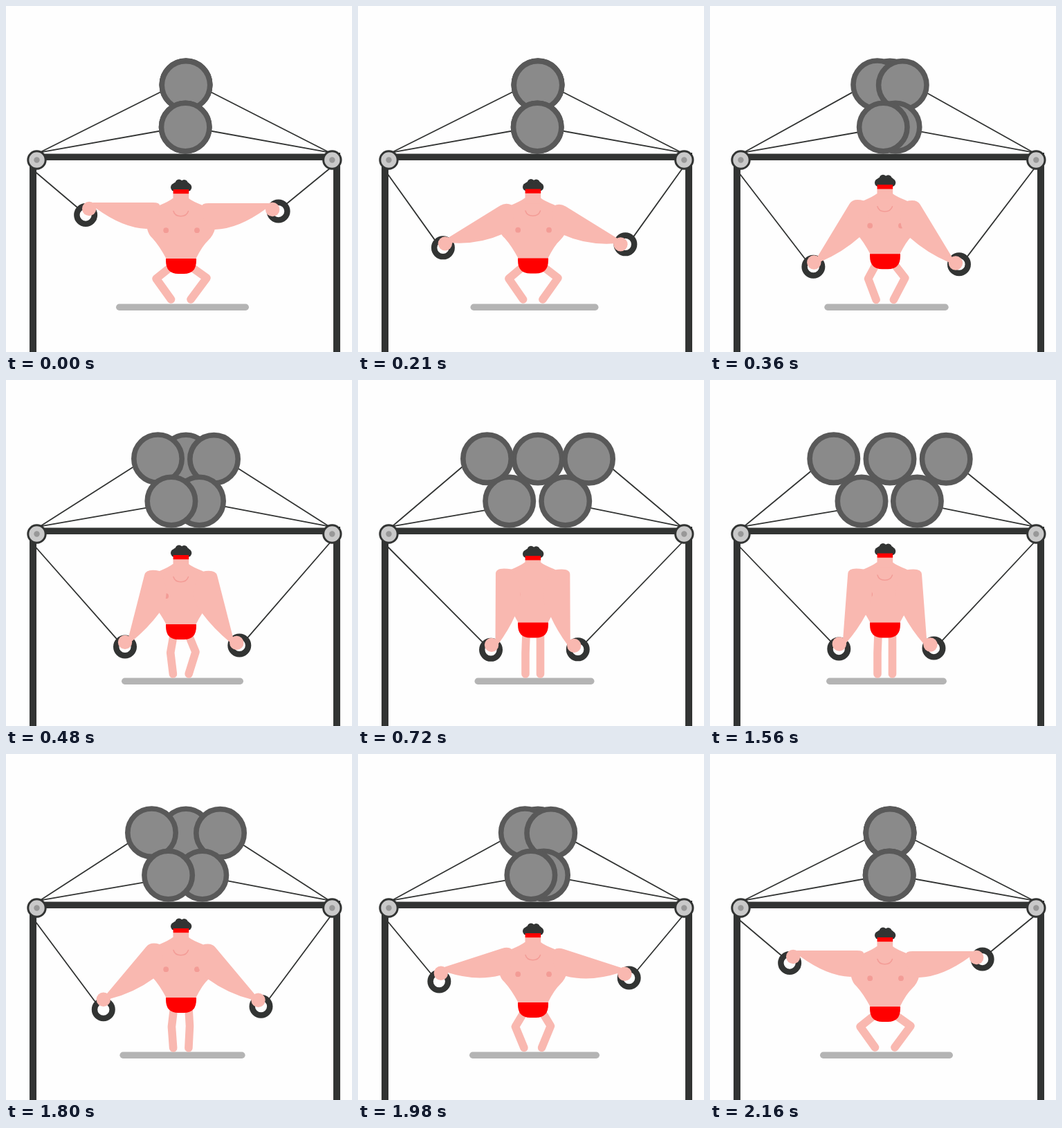
These frames come from a looping animation (500 px wide and 500 px high, 2.55 s). An HTML page with a canvas:

```html
<!DOCTYPE html>
<html lang="en">
<head>
<meta charset="utf-8">
<title>Ring press</title>
<style>
  html, body { margin: 0; width: 100%; height: 100%; overflow: hidden; background: #fefefe; }
  canvas { display: block; }
</style>
</head>
<body>
<canvas id="stage" width="500" height="500"></canvas>
<script>
const ctx = document.getElementById('stage').getContext('2d');
const LOOP = 2550, STEP = 30, TAU = Math.PI * 2;
const DARK = '#323433', SKIN = '#f9b8b0', BLUSH = '#f39c96', RED = '#ff0000';

// Keyed values, all sharing the same key times.
const times = [0, 210, 480, 720, 900, 1440, 1560, 1800, 2160];
const tracks = {
  swing:   [0, .367, .844, 1, 1.01, 1, .955, .567, 0],
  lift:    [0, .5, 12, 14.5, 14.5, 14.5, 14.5, 13, 0],
  nod:     [0, 0, 0, 3.7, 4, 1, 0, 0, 0],
  chin:    [1, 1, 1, 0, 0, .3, 1, 1, 1],
  knee:    [290, 289, 274, 263.5, 263.5, 263.5, 263.5, 265.5, 290],
  top:     [0, 0, 40.5, 73.5, 82, 82, 81.2, 49.5, 0],
  bottom:  [0, 0, 20.3, 40.5, 40.5, 40.5, 40.2, 24.6, 0],
  cordY:   [106, 106, 103, 95, 98, 104, 104.5, 107, 106],
  leftX:   [-5, -3, 0, -1, -1, -1, -.5, 0, -5],
  leftY:   [9, 6, 6.5, 7, 7, 7, 7, 14.5, 9],
  rightX:  [-8.5, -7, -4, -5.5, -5.5, -5.5, -5, -4, -8.5],
  rightY:  [2.5, 0, 3.5, 5.5, 5.5, 5.5, 5, 9, 2.5]
};

// Monotone cubic interpolation: smooth, without overshoot.
function sample(v, t) {
  const rate = i => (v[i + 1] - v[i]) / (times[i + 1] - times[i]);
  const slope = i => {
    if (i === 0 || i === times.length - 1) return 0;
    const a = rate(i - 1), b = rate(i);
    return a * b > 0 ? 2 * a * b / (a + b) : 0;
  };
  let i = 0;
  while (i < times.length - 2 && t >= times[i + 1]) i++;
  const h = times[i + 1] - times[i], s = Math.min(1, (t - times[i]) / h), q = 1 - s;
  return v[i] * q * q * (1 + 2 * s) + v[i + 1] * s * s * (3 - 2 * s)
    + h * (slope(i) * s * q * q - slope(i + 1) * s * s * q);
}

function disc(x, y, r, fill, stroke, width) {
  ctx.beginPath();
  ctx.arc(x, y, r, 0, TAU);
  if (fill) { ctx.fillStyle = fill; ctx.fill(); }
  if (stroke) { ctx.strokeStyle = stroke; ctx.lineWidth = width; ctx.stroke(); }
}

function line(points, width, color) {
  ctx.beginPath();
  points.forEach(p => ctx.lineTo(...p));
  ctx.lineWidth = width;
  ctx.strokeStyle = color;
  ctx.stroke();
}

function rect(x, y, w, h, color) {
  ctx.fillStyle = color;
  ctx.fillRect(x, y, w, h);
}

function shape(d, color) {
  ctx.fillStyle = color;
  ctx.fill(new Path2D(d));
}

function shifted(x, y, draw) {
  ctx.save();
  ctx.translate(x, y);
  draw();
  ctx.restore();
}

const weight = (x, y) => disc(x, y, 34.7, '#8a8a8a', '#595959', 7.6);

function weights(p) {
  const k = p.top / 82, a = p.top, b = p.bottom;
  line([[50, 211], [260 - a, p.cordY]], 1.8, DARK);
  line([[466, 211], [260 + a, p.cordY + 5 * k]], 1.8, DARK);
  line([[50, 211.3], [259.5 - b, 174 + 9 * k]], 1.8, DARK);
  line([[466, 211.3], [259.5 + b, 174 + 4 * k]], 1.8, DARK);
  weight(260, 114);
  weight(260 - a, 113.7);
  weight(260 + a, 114.3);
  weight(259.2 + b, 175);
  weight(259.2 - b, 175);
}

function pulley(x) {
  disc(x, 222.5, 12.7, '#c9c9c9', DARK, 3);
  disc(x, 222.5, 4.2, '#989898');
}

function frame() {
  rect(34, 222, 10, 278, DARK);
  rect(473, 212, 10, 288, DARK);
  rect(44, 213.5, 436, 9.5, DARK);
  pulley(44.5);
  pulley(471.3);
}

function legs(p) {
  const w = p.lift / 14.5;
  const foot = 424 + w, hip = 378 - 10 * w;
  line([[237 + 6 * w, hip], [217 + 25 * w, 394], [238.5 + 3.5 * w, foot]], 11.6, SKIN);
  line([[269 - 5.5 * w, hip], [p.knee, 393], [267 - 3.5 * w, foot]], 11.6, SKIN);
}

function torso() {
  shape(`M241 278Q236 282 222 288L208 300L204 322Q206 331 212 336Q222 347 232 366
    H274Q284 346 292 339Q300 331 302 322L298 300L284 288Q269 282 264 278Z`, SKIN);
  disc(231.2, 324.2, 3.9, BLUSH);
  disc(276, 324.2, 3.9, BLUSH);
  shape('M231 365H275V368Q275 387 257 387H249Q231 387 231 368Z', RED);
}

function head(chin) {
  rect(241.5, 262, 22.7, 24, SKIN);
  ctx.globalAlpha = chin;
  ctx.lineWidth = 1.5;
  ctx.strokeStyle = BLUSH;
  ctx.stroke(new Path2D('M242 296.5Q244 303.8 252.7 303.8Q261 303.8 263.5 296.5'));
  ctx.globalAlpha = 1;
  [[244, 262, 6], [262.3, 262, 6], [250, 255.8, 5.3], [257.5, 256.3, 5.3], [246, 259, 4.5], [261, 259, 4.5]]
    .forEach(c => disc(...c, DARK));
  rect(244, 257, 18, 9, DARK);
  rect(241.7, 265, 22.4, 6.2, RED);
}

// Drawn as the left arm; the right one is mirrored by the caller.
function arm(p, ringX, ringY, ropeX, ropeY, cover) {
  const u = p.swing, e = Math.pow(u, 1.4);
  const angle = (90 * u - 10.06) * Math.PI / 180;
  const hx = 208.75 - 90 * Math.cos(angle), hy = 308.75 + 90 * Math.sin(angle);
  const rx = hx + ringX, ry = hy + ringY;
  line([[ropeX, ropeY + p.lift], [rx - 11, ry - 10]], 1.8, DARK);
  disc(rx, ry, 12.8, null, DARK, 8.4);

  const kx = 222 - 23 * u, ky = 284;
  const wx = hx + 5.5, wy = hy - 9;
  const ix = hx + 9.5, iy = hy - 1;
  const ax = 203 + 24 * e, ay = 322 + 33 * e;
  ctx.beginPath();
  ctx.moveTo(222, 288);
  ctx.quadraticCurveTo(kx, ky, kx + .1 * (wx - kx), ky + .1 * (wy - ky));
  ctx.lineTo(wx, wy);
  ctx.lineTo(hx, hy);
  ctx.lineTo(ix, iy);
  ctx.quadraticCurveTo((ix + ax) / 2 + 3, (iy + ay) / 2 + 14 * (1 - u), ax, ay);
  ctx.quadraticCurveTo(222 + (23 + cover) * u, 320, 222, 288);
  ctx.fillStyle = SKIN;
  ctx.fill();
  disc(hx, hy, 10.2, SKIN);
}

function render(t) {
  const p = {};
  for (const name in tracks) p[name] = sample(tracks[name], t);
  rect(0, 0, 500, 500, '#fefefe');
  ctx.lineCap = ctx.lineJoin = 'round';
  weights(p);

  const half = 91.3 - 9.5 * p.swing;
  line([[255 - half, 435.2], [255 + half, 435.2]], 9.4, '#b4b4b4');
  legs(p);
  shifted(0, -p.lift, () => {
    torso();
    arm(p, p.leftX, p.leftY, 38, 236, 0);
    shifted(505.3, 1, () => {
      ctx.scale(-1, 1);
      arm(p, p.rightX, p.rightY, 35.3, 232, 6);
    });
  });
  shifted(0, p.nod - p.lift, () => head(p.chin));
  frame();
}

function tick() {
  const t = performance.now() % LOOP;
  render(Math.floor(t / STEP) * STEP);
  requestAnimationFrame(tick);
}
tick();
</script>
</body>
</html>
```
